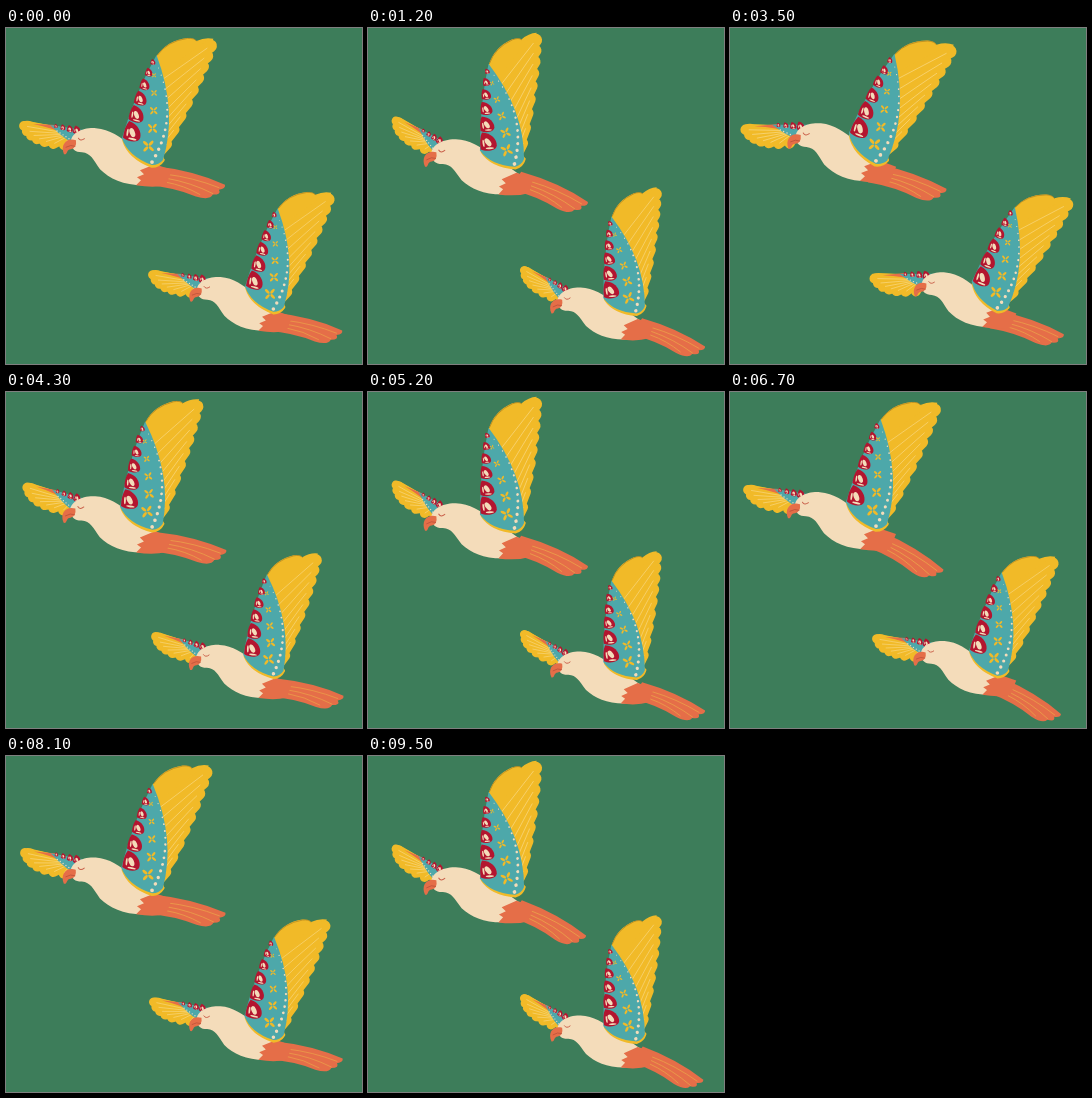
Write an HTML page with a canvas that moves like this. It is 356x336 px and loops after 9.6 s.

```html
<!DOCTYPE html>
<html>
<head>
<meta charset="utf-8">
<style>
html, body { margin: 0; width: 100%; height: 100%; overflow: hidden; background: #3d7d5a; }
canvas { display: block; }
</style>
</head>
<body>
<canvas id="stage" width="356" height="336"></canvas>
<script>
const ctx = document.getElementById('stage').getContext('2d');
const GREEN = '#3d7d5a', YELLOW = '#f1ba28', PALE = '#f8d475', TEAL = '#4da8aa',
      RED = '#b3152f', CREAM = '#f4dcba', ORANGE = '#e56e48', GOLD = '#eba04a', OLIVE = '#b98b22';
const STEP = 100, STEPS = 96, BEAT = 40;

function fill(d, color) {
  ctx.fillStyle = color;
  ctx.fill(new Path2D(d));
}
function stroke(d, color, width) {
  ctx.strokeStyle = color;
  ctx.lineWidth = width;
  ctx.stroke(new Path2D(d));
}
function oval(x, y, rx, ry, turn, color) {
  ctx.fillStyle = color;
  ctx.beginPath();
  ctx.ellipse(x, y, rx, ry, turn, 0, 7);
  ctx.fill();
}
function posed(x, y, degrees, scale, draw) {
  ctx.save();
  ctx.translate(x, y);
  ctx.rotate(degrees * Math.PI / 180);
  ctx.scale(scale, scale);
  ctx.translate(-x, -y);
  draw();
  ctx.restore();
}
function repeat(count, draw) {
  for (let i = 0; i < count; i++) draw(i, i / (count - 1));
}
// Point at t on the quadratic curve a, b, c.
const along = (a, b, c, t) =>
  [0, 1].map(k => (1 - t) ** 2 * a[k] + 2 * t * (1 - t) * b[k] + t * t * c[k]);

// Round-capped strokes from root(t) to tip(t), each with a pale quill.
function feathers(count, root, tip, width) {
  repeat(count, (i, t) => stroke(`M${root(t)}L${tip(t)}`, YELLOW, width(t)));
  repeat(count, (i, t) => {
    const a = root(t), b = tip(t), end = a.map((v, k) => v + (b[k] - v) * .93);
    stroke(`M${a}L${end}`, PALE, .8);
  });
}

// Red drop, pointed at the top, holding cream petals.
function scallop(x, y, r) {
  ctx.save();
  ctx.translate(x, y);
  ctx.scale(r, r);
  ctx.rotate(.15);
  fill('M-.5 -1.1C.5 -.9 1 -.1 .9 .5C.8 1.1 -.3 1.1 -.9 .7C-.9 0 -.8 -.6 -.5 -1.1Z', RED);
  oval(0, .05, .27, .5, -.5, CREAM);
  oval(-.5, .1, .1, .4, 0, CREAM);
  oval(.1, .72, .45, .1, .1, CREAM);
  ctx.restore();
}

function flower(x, y, r) {
  repeat(4, i => {
    const a = .75 + i * Math.PI / 2;
    oval(x + Math.cos(a) * r * .6, y + Math.sin(a) * r * .6, r * .48, r * .22, a, YELLOW);
  });
}

function farWing() {
  fill('M14 96Q18 91 27 94L76 103L66 118L24 106Z', YELLOW);
  feathers(7, () => [66, 106], t => along([18, 98], [24, 115], [58, 117], t), () => 10);
  fill('M27 96L50 97L64 108Q48 100 27 96Z', ORANGE);
  fill('M44 97L80 102L74 118Q61 114 44 97Z', TEAL);
  repeat(4, i => scallop(50 + 7 * i, 98 + 1.4 * i, 2 + .7 * i));
  repeat(6, i => oval(51 + 3 * i, 103 + 1.9 * i, .7, .7, 0, CREAM));
}

function nearWing() {
  fill('M151 28Q162 12 182 10Q189 10 191 13Q200 9 208 11L196 40L154 134L146 138Z', YELLOW);
  feathers(10,
    t => along([156, 52], [172, 95], [151, 130], t),
    t => along([205, 18], [190, 62], [153, 131], t),
    t => 13 - 3 * t);
  stroke('M152 27Q162 13 182 10.5Q189 10 191 13', OLIVE, .8);
  stroke('M118 112Q123 129 146 138Q153 138 157 132', YELLOW, 3.5);
  fill('M151 27Q130 64 116 110Q122 128 146 137Q153 137 157 132Q172 84 151 27Z', TEAL);
  repeat(6, i => scallop(126.5 + 4.2 * i, 104 - 18.5 * i + .9 * i * i, 9.5 - 1.35 * i));
  repeat(5, i => flower(148.5 - 6 * .3 ** i, 118 - 17.7 * i, 6.5 - i));
  repeat(15, (i, t) => {
    const r = .5 + 1.4 * t;
    oval(...along([153, 40], [173, 90], [146, 134], t), r, r, 0, CREAM);
  });
}

function tail() {
  fill('M148 138Q187 142 219 156Q220 160 213 161Q216 166 207 166Q204 172 190 168Q168 159 140 157Z', ORANGE);
  stroke('M160 146Q187 149 213 159M160 150Q185 154 207 165M160 154Q178 157 194 166', GOLD, .8);
}

function body() {
  fill('M65 115C64 105 77 99 90 100C104 101 114 109 125 117L152 138L142 157C119 158 104 151 94 141C87 131 85 125 76 124C69 124 66 121 65 115Z', CREAM);
  fill('M149 136L134 142L138 146L131 149L135 152L130 157Q148 160 160 157L166 142Z', ORANGE);
  fill('M70 112C61 109 54 116 58 126C62 127 60 121 65 121Q71 120 70 112Z', ORANGE);
  stroke('M60 119Q65 116 69 118', '#b9503a', .8);
  stroke('M72.5 110Q74.5 113.5 78.5 110.5', '#c9604a', 1);
}

function bird(flap, sway) {
  ctx.save();
  ctx.translate(0, -.5 * flap);
  posed(150, 150, .15 * flap, 1, () => posed(78, 108, -1.3 * flap, 1 + .0055 * flap, farWing));
  ctx.save();
  ctx.translate(-.2 * flap, .2 * flap);
  posed(145, 148, sway, 1, tail);
  ctx.restore();
  posed(150, 150, .15 * flap, 1, body);
  ctx.restore();

  ctx.save();
  ctx.translate(.2 * flap, 0);
  posed(156, 123, flap, 1 + .002 * flap, nearWing);
  ctx.restore();
}

function frame() {
  let step = Math.floor(performance.now() / STEP) % STEPS;
  if (step === 65 || step === 66) step = 64; // brief hold in the beat
  const angle = offset => (step - offset) / BEAT * 2 * Math.PI;
  const a = angle(33.5);
  const flap = -6.2 + 12.5 * Math.cos(a) + 1.3 * Math.cos(2 * a);
  const sway = 10 - 10 * Math.cos(angle(2));

  ctx.fillStyle = GREEN;
  ctx.fillRect(0, 0, 356, 336);
  ctx.lineCap = 'round';
  bird(flap, sway);
  ctx.save();
  ctx.translate(129.7, 154.6);
  ctx.scale(.943, .943);
  bird(flap, sway);
  ctx.restore();
  requestAnimationFrame(frame);
}
frame();
</script>
</body>
</html>
```
